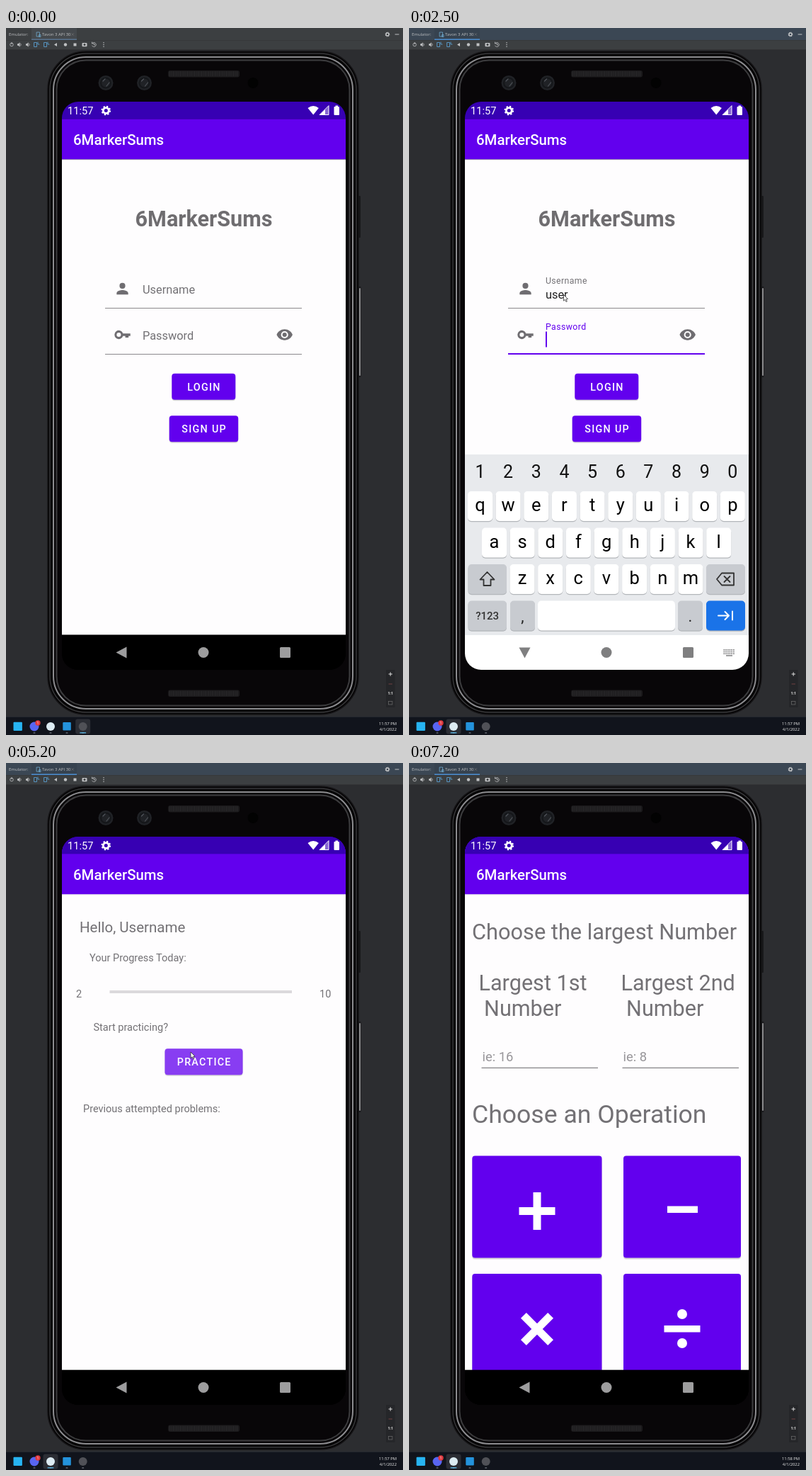
An HTML page for the animation above (7.6 s loop, 561 by 998 pixels).

```html
<!DOCTYPE html>
<html lang="en">
<head>
<meta charset="utf-8">
<title>Phone emulator demo</title>
<style>
html, body { margin: 0; width: 100%; height: 100%; overflow: hidden; background: #2c2d30; }
svg { display: block; width: 561px; height: 998px; font-family: Roboto, sans-serif; }
.desk { font-family: "Open Sans", "Noto Sans", sans-serif; }
.line { fill: none; stroke-linecap: round; stroke-linejoin: round; }
</style>
</head>
<body>
<svg id="stage" viewBox="0 0 561 998" xmlns="http://www.w3.org/2000/svg"></svg>
<script>
const LOOP = 7600, STEP = 100;
const PURPLE = '#6200ee', GREY = '#737175', CX = 279.5, CY = 505;
const APP = '6MarkerSums';

const rect = (x, y, w, h, fill, rx = 0, more = '') =>
  `<rect x="${x}" y="${y}" width="${w}" height="${h}" rx="${rx}" fill="${fill}" ${more}/>`;
const disc = (x, y, r, fill, more = '') => `<circle cx="${x}" cy="${y}" r="${r}" fill="${fill}" ${more}/>`;
const text = (x, y, size, str, fill = GREY, more = '') =>
  `<text x="${x}" y="${y}" font-size="${size}" fill="${fill}" xml:space="preserve" ${more}>${str}</text>`;
const mid = 'text-anchor="middle"';
const line = (d, color, width = 1, more = '') =>
  `<path class="line" d="${d}" stroke="${color}" stroke-width="${width}" ${more}/>`;
const shape = (d, fill, more = '') => `<path d="${d}" fill="${fill}" ${more}/>`;
const group = (id, inner, more = '') => `<g id="${id}" ${more}>${inner}</g>`;
const ring = (x, y, r, color, width) => disc(x, y, r, 'none', `stroke="${color}" stroke-width="${width}"`);
const icon = (x, y, d) => shape(d, '#6f6d71', `fill-rule="evenodd" transform="translate(${x} ${y}) scale(1.021) translate(-12 -12)"`);

function gear(x, y, r, color) {
  const tooth = 2 * Math.PI * r * .82 / 16;
  return ring(x, y, r * .58, color, r * .42) +
    disc(x, y, r * .82, 'none', `stroke="${color}" stroke-width="${r * .36}" stroke-dasharray="${tooth}"`);
}

function button(id, x, y, w, h, label) {
  return rect(x, y + 1.5, w, h, '#000', 4, 'opacity=".16"') + rect(x, y, w, h, PURPLE, 4) +
    rect(x, y, w, h, '#fff', 4, `id="${id}" opacity="0"`) +
    text(x + w / 2 + .7, y + h / 2 + 5.2, 14.3, label, '#fff', `${mid} font-weight="500" letter-spacing="1.28"`);
}

const page = (id, inner) => group(id,
  rect(79, 104, 401, 24.7, '#3700b3') + rect(79, 128.5, 401, 57, PURPLE) +
  rect(79, 185.5, 401, 671.2, '#fefdfe') + rect(79, 185.5, 401, 1, '#000', 0, 'opacity=".08"') +
  text(95, 165.4, 20.4, APP, '#fff', 'font-weight="500"') + inner + rect(79, 856.7, 401, 50, '#000'));

function field(id, y) {
  return group(id + 'Label', '') + rect(140, y, 278, 1, '#8b898c', 0, `id="${id}Line"`) +
    text(193, y - 13.5, 16.34, '', '#212121', `id="${id}Text"`) +
    rect(193, y - 31.5, 2, 22, PURPLE, 0, `id="${id}Caret"`);
}

function loginPage() {
  const person = 'M12 12a4 4 0 1 0 0-8a4 4 0 0 0 0 8zM12 14c-2.67 0-8 1.34-8 4v2h16v-2c0-2.66-5.33-4-8-4z';
  const key = 'M12.8 10.400a6 6 0 1 0 0 3.200H16v2.400h4.500v-2.400H23v-3.200zM7 15a3 3 0 1 1 0-6a3 3 0 0 1 0 6z';
  const eye = 'M12 4.5C7 4.5 2.7 7.6 1 12c1.7 4.4 6 7.5 11 7.5s9.3-3.1 11-7.5c-1.7-4.4-6-7.5-11-7.5z' +
    'M12 17a5 5 0 1 1 0-10a5 5 0 0 1 0 10zM12 9a3 3 0 1 0 0 6a3 3 0 0 0 0-6z';
  return page('login',
    text(CX, 279.5, 30.6, APP, '#6f6d70', `${mid} font-weight="700"`) +
    icon(164.5, 368, person) + icon(164.5, 433, key) + icon(393.7, 433, eye) +
    field('user', 395) + field('pass', 460) +
    button('loginTap', 234.3, 487.8, 90, 37, 'LOGIN') + button('signTap', 230.7, 547.3, 97.5, 37, 'SIGN UP'));
}

const homePage = () => page('home',
  text(104, 238.5, 20.5, 'Hello, Username') + text(118, 280, 14.5, 'Your Progress Today:') +
  text(99, 330.5, 14.5, '2') + text(443, 330.5, 14.5, '10') + rect(146.5, 321, 257.5, 4, '#dbd9dc') +
  text(123.5, 378, 14.5, 'Start practicing?') + button('practiceTap', 224.5, 403.3, 110, 37, 'PRACTICE') +
  text(109, 492.5, 14.5, 'Previous attempted problems:'));

function choosePage() {
  const tile = (x, y, w) => rect(x, y + 2, w, 144, '#000', 4, 'opacity=".16"') + rect(x, y, w, 144, PURPLE, 4);
  const input = (x, hint) => text(x + 1, 421, 18.4, hint, '#98969a') + rect(x, 429.8, 164.5, 1.2, '#807e82');
  const column = (x, nth) => text(x, 320.5, 30.6, 'Largest ' + nth) + text(x + 7.6, 356.5, 30.6, 'Number');
  const cross = (w, h, thick) => rect(-w / 2, -thick / 2, w, thick, '#fff') + rect(-thick / 2, -h / 2, thick, h, '#fff');
  return page('choose',
    text(89, 249, 30.75, 'Choose the largest Number') + column(98.5, '1st') + column(299.5, '2nd') +
    input(102.5, 'ie: 16') + input(301.5, 'ie: 8') + text(89, 507.5, 35.6, 'Choose an Operation') +
    tile(89.3, 554.5, 183.2) + tile(303, 554.5, 166) + tile(89.3, 721, 183.2) + tile(303, 721, 166) +
    `<g transform="translate(181 632.5)">${cross(51, 53, 11)}</g>` + rect(365, 625.5, 43, 9.5, '#fff') +
    `<g transform="translate(181 799) rotate(45)">${cross(54, 54, 11)}</g>` +
    rect(360.5, 794, 51, 9.5, '#fff') + disc(386, 778, 7, '#fff') + disc(386, 819, 7, '#fff'));
}

function keyboard() {
  const pitch = 39.65, keyW = 35, dim = '#c8cbd0';
  const cap = (x, y, w, fill = '#fff') => rect(x, y + 1.2, w, 42, '#b3b6ba', 5) + rect(x, y, w, 42, fill, 5);
  const row = (letters, cx, y) => [...letters].map((c, i) =>
    cap(cx + i * pitch - keyW / 2, y, keyW) + text(cx + i * pitch, y + 28, 25.5, c, '#000', mid)).join('');
  const digits = (cx, y, size, color) => [...'1234567890'].map((c, i) =>
    text(cx + i * pitch, y, size, c, color, mid)).join('');
  const c = '#686c71';
  const tools = disc(105, 625, 15.5, '#fff') + line('M108 620l-5 5l5 5', c, 2) +
    ring(155.5, 623.5, 5.5, c, 2) + line('M160 628l5.500 5.500', c, 2.2) +
    line('M209 618h11q2 0 2 2v9l-5 5h-8q-2 0-2-2v-12q0-2 2-2M211 627q3 5 7 0M211.500 623v.1M217.500 623v.1', c, 1.8) +
    text(271.5, 630, 14, 'GIF', c, `${mid} font-weight="700"`) +
    line('M324 618h12v16h-12zM328 618v-2h4v2M327 623h6M327 626h6M327 629h4', c, 1.8) +
    rect(366, 613, 1, 24, '#d0d2d5') + [394.5, 401, 407.5].map(x => disc(x, 625, 2, c)).join('') +
    rect(456, 615, 5.5, 12, c, 2.7) + line('M452.500 624q0 6 6.200 6q6.200 0 6.200-6M458.700 630v4', c, 1.7);
  return group('keyboard',
    rect(79, 602, 401, 256, '#e8eaed') + rect(79, 857, 401, 50, '#fff') +
    group('tools', tools) + group('digits', digits(100.5, 635, 25, '#111')) +
    row('qwertyuiop', 100.5, 654) + group('hints', digits(113, 664.5, 10, '#666')) +
    row('asdfghjkl', 120.5, 705.5) + row('zxcvbnm', 160, 757) +
    cap(83.5, 757, 54.5, dim) + line('M110.500 768l10 10.500h-5v8.500h-10v-8.500h-5z', '#333', 1.8) +
    cap(420, 757, 55, dim) + line('M442 769.500h17v17h-17l-7-8.500zM445.500 774l8 8M453.500 774l-8 8', '#333', 1.8) +
    cap(83.5, 808.5, 54.5, dim) + text(110.7, 835, 15, '?123', '#333', `${mid} font-weight="500"`) +
    cap(143, 808.5, 35, dim) + text(160.5, 838, 22, ',', '#222', mid) + cap(182, 808.5, 194) +
    cap(380, 808.5, 35, dim) + text(397.5, 838, 22, '.', '#222', mid) + cap(420, 808.5, 55, '#1a73e8') +
    line('M437 829.500h15M446.500 824l5.500 5.500l-5.500 5.500M457 823.500v12', '#fff', 2));
}

function statusBar() {
  return text(87, 121.8, 14.6, '11:57', '#fff') + gear(141.3, 116.5, 6.8, '#fff') +
    shape('M426.500 113q7.700-6 15.400 0l-7.700 9.500z', '#fff') +
    shape('M456 110v12.500h-12.500z', '#fff', 'opacity=".4"') + shape('M451 115v7.500h-7.500z', '#fff') +
    line('M456 110v12.500h-12.500z', '#fff', 1) + rect(463.5, 111, 7.5, 12, '#fff', 1) + rect(465.5, 109.5, 3.5, 2, '#fff');
}

const navBar = () => group('nav',
  `<path id="back" d="M-8 0L7 -8V8z"/><circle cx="279" cy="881.5" r="7.500"/>
   <rect x="387" y="874" width="15" height="15" rx="1.500"/>` +
  group('imeIcon', [0, 1, 2].map(r => [0, 1, 2, 3, 4, 5].map(i =>
    `<rect x="${444.5 + i * 2.7}" y="${877 + r * 2.7}" width="1.700" height="1.700"/>`).join('')).join('') +
    '<rect x="448" y="885.200" width="9" height="1.500"/>'));

function phone() {
  const speaker = y => rect(229, y, 101, 9.5, '#1c1b1d', 3) +
    `<path d="M231 ${y + 4.7}h97" stroke="#2b2a2c" stroke-width="7" stroke-dasharray="1 1.500"/>`;
  const camera = x => disc(x, 77.5, 10.5, '#202226') + ring(x, 77.5, 7, '#15171a', 2) +
    line(`M${x - 4} 75l3-3M${x + 1} 82l4-5`, '#50545a', 1.2);
  const frame = (inset, color, width, fill) => rect(59 + inset, 33 + inset, 439 - 2 * inset, 936 - 2 * inset,
    fill, 54 - inset, `stroke="${color}" stroke-width="${width}"`);
  return rect(497, 237, 4, 59, '#18181a', 1) + rect(497, 365, 4.5, 128, '#1b1b1d', 1) + rect(499, 367, 2, 124, '#8a8a8c', 1) +
    frame(0, '#151416', 1.5, '#050405') + frame(3, '#39393b', 1.5, 'none') +
    frame(8, '#8c8c8f', 2, '#080608') + frame(12.5, '#3c3c3e', 2, 'none') +
    speaker(60) + speaker(934.5) + camera(141) + camera(195.5) + disc(349, 77.5, 7.5, '#020202');
}

function desktop() {
  const c = '#bfc1c3';
  const tools = ring(8, 23.5, 2.3, c, .8) + rect(7.6, 20, .9, 3, c) +
    [19, 31].map(x => shape(`M${x - 3} 22.300h1.500l2-2v6.400l-2-2h-1.500z`, c) + line(`M${x + 1.7} 22q1.300 1.500 0 3`, c, .8)).join('') +
    [43, 57].map(x => line(`M${x - 3} 20.500h3.500v6h-3.500zM${x + 2} 20v3h2`, '#5b9fd0', .9)).join('') +
    shape('M68 23.500l4-2.500v5z', c) + disc(84, 23.5, 2.2, c) + rect(95.5, 21.5, 4, 4, c) +
    rect(107.5, 21, 7, 5.3, c, 1) + disc(111, 23.6, 1.5, '#3c3f41') +
    line('M122 21.500a3 3 0 1 1-.4 3.500M121.500 20v2h2M124.500 22v1.800h1.300', c, .8) +
    [20.8, 23.5, 26.2].map(y => disc(138, y, .75, c)).join('');
  const zoom = rect(537, 906, 12.5, 53, '#252629', 1) + line('M541 912h4.500M543.200 909.800v4.500', '#ddd', 1) +
    line('M541 926h4.500', '#7a4545', .9) + text(543.2, 941, 5.2, '1:1', '#ddd', `${mid} font-weight="700"`) +
    rect(540.4, 950.5, 5.5, 4.5, 'none', 0, 'stroke="#666" stroke-width=".8"');
  const taskbar = rect(0, 972, 561, 26, '#11141c') + rect(0, 972, 561, .7, '#2c3038') +
    rect(0, 975.5, 21, 21, '#fff', 3, 'id="activeBox" opacity=".11"') +
    rect(10.5, 979.7, 12.4, 12.4, '#27b4f2', 1) + disc(40, 986, 6.5, '#5865f2') +
    disc(45, 981, 3.7, '#e0383e') + text(45, 983, 5, '1', '#fff', mid) +
    disc(63, 986, 6, '#dcebf2') + rect(80.3, 980, 11.5, 11.5, '#2493dc', 1) + disc(108.7, 986, 6, '#505157') +
    [40, 63, 86, 108.7].map(x => rect(x - 1.5, 994.5, 3, 1, '#8b8f99', .5)).join('') +
    rect(0, 994.3, 9, 1.3, '#58bdf0', .6, 'id="activeMark"') +
    text(552, 984, 5.8, '', '#eee', 'id="clock" text-anchor="end"') + text(552, 991.6, 5.8, '4/1/2022', '#eee', 'text-anchor="end"');
  return rect(0, 0, 561, 998, '#2c2d30') + rect(0, 0, 561, 31, '#3c3f41') + rect(0, 0, 561, 17, '', 0, 'id="header"') +
    rect(0, 17, 561, .6, '#323436') + rect(0, 30.5, 561, .7, '#2a2b2d') + text(4, 11.3, 6, 'Emulator:', c) +
    rect(36, 0, 64, 17, '', 0, 'id="tab"') + rect(36, 15.3, 64, 1.7, '', 0, 'id="tabLine"') +
    line('M43.500 6h4v6h-4zM47 9.500h2v3h-2z', '#6fa9cc', .8) + text(51, 11.3, 6, 'Tavon 3 API 30', c) +
    line('M92.700 7.500l3 3M95.700 7.500l-3 3', '#777', .6) +
    gear(539, 9, 3.4, c) + line('M550 9h5', c, 1) + tools + zoom + taskbar;
}

const stage = document.getElementById('stage');
stage.innerHTML = '<defs><clipPath id="screen"><rect x="79" y="104" width="401" height="802" rx="23"/></clipPath></defs>' +
  group('desk', desktop(), 'class="desk"') + phone() +
  group('view', rect(79, 104, 401, 802, '#000') + loginPage() + homePage() + choosePage() + keyboard() + statusBar() + navBar(),
    'clip-path="url(#screen)"') +
  shape('M0 0V8.600L2 6.800L3.500 10L4.900 9.400L3.500 6.300L6 6z', '#fff', 'id="pointer" stroke="#333" stroke-width=".8" stroke-linejoin="round"');

const $ = id => document.getElementById(id);
const set = (id, attrs) => { for (const k in attrs) $(id).setAttribute(k, attrs[k]); };
const show = (id, on) => set(id, { visibility: on ? 'visible' : 'hidden' });
const ramp = (t, from, length) => Math.min(1, Math.max(0, (t - from) / length));
const lerp = (a, b, u) => a + (b - a) * u;
const outQuad = u => 1 - (1 - u) ** 2;

// Two-piece "fast out, extra slow in" curve
function emphasized(x) {
  const [px, py] = x < 1 / 6 ? [[0, .05, .1333, 1 / 6], [0, 0, .06, .4]] : [[1 / 6, .2083, .25, 1], [.4, .82, 1, 1]];
  const bez = ([a, b, c, d], u) => a * (1 - u) ** 3 + 3 * b * u * (1 - u) ** 2 + 3 * c * u * u * (1 - u) + d * u ** 3;
  let lo = 0, hi = 1;
  for (let i = 0; i < 20; i++) {
    const m = (lo + hi) / 2;
    if (bez(px, m) < x) lo = m; else hi = m;
  }
  return bez(py, lo);
}

const POINTER = [[500, 90, 450], [1000, 218.5, 376.5], [2700, 218.5, 376.5], [3000, 261.5, 499], [3500, 261.5, 499],
  [4000, 261.5, 517], [4200, 261.5, 517], [4700, 252, 373], [4800, 261, 408], [5300, 261, 408],
  [5700, 200, 412], [5800, 200, 412], [6600, 108, 350.5]];

function pointerAt(t) {
  const i = POINTER.findIndex(p => p[0] > t);
  if (i < 0) return POINTER.at(-1).slice(1);
  if (i === 0) return POINTER[0].slice(1);
  const [a, b] = [POINTER[i - 1], POINTER[i]];
  const u = ramp(t, a[0], b[0] - a[0]);
  return [lerp(a[1], b[1], u), lerp(a[2], b[2], u)];
}

const typed = (t, str, times) => str.slice(0, times.filter(at => t >= at).length);

function drawField(id, label, y, t, focusAt, blurAt, value) {
  const u = outQuad(ramp(t, focusAt, 140)), focused = t >= focusAt && t < blurAt;
  $(id + 'Label').innerHTML = text(193, lerp(y - 20, y - 34, u), lerp(16.34, 12.25, u), label,
    focused ? PURPLE : GREY, `letter-spacing="${.42 * u}"`);
  set(id + 'Line', { height: focused ? 2 : 1, y: focused ? y - 1 : y, fill: focused ? PURPLE : '#8b898c' });
  $(id + 'Text').textContent = value;
  set(id + 'Caret', { x: 193 + (value ? $(id + 'Text').getComputedTextLength() + 1 : 0) });
  show(id + 'Caret', focused && (value !== '' || (t - focusAt) % 1000 < 500));
}

function openPage(t, start, from, to) {
  const u = ramp(t, start, 400), e = emphasized(u);
  const zoom = s => `translate(${CX} ${CY}) scale(${s}) translate(${-CX} ${-CY})`;
  set(from, { transform: zoom(1 + .05 * e) });
  set(to, { transform: zoom(.85 + .15 * e), opacity: ramp(t, start + 35, 50) });
}

function draw(t) {
  const active = t >= 1100, slot = active ? 63 : 108.7;
  set('activeBox', { x: slot - 10.5 });
  set('activeMark', { x: slot - 4.5 });
  set('header', { fill: active ? '#3b4754' : '#3c3f41' });
  set('tab', { fill: active ? '#36424f' : '#45494d' });
  set('tabLine', { fill: active ? '#4a88c7' : '#587089' });
  $('clock').textContent = t < 7200 ? '11:57 PM' : '11:58 PM';

  drawField('user', 'Username', 395, t, 1130, 2340, typed(t, 'user', [1700, 1800, 2000, 2100]));
  drawField('pass', 'Password', 460, t, 2340, 9999, typed(t, '••••', [2600, 2700, 2800, 2900]));
  set('loginTap', { opacity: t >= 3200 && t < 3500 ? .24 : 0 });
  set('practiceTap', { opacity: t >= 5100 && t < 5500 ? .24 : 0 });

  const raised = outQuad(ramp(t, 1230, 280)) * (1 - ramp(t, 3350, 250) ** 2);
  set('keyboard', { transform: `translate(0 ${304 * (1 - raised)})`, opacity: raised ** 1.2 });
  const numeric = t >= 2400;
  set('tools', { display: numeric ? 'none' : 'inline' });
  set('hints', { display: numeric ? 'none' : 'inline' });
  set('digits', { display: numeric ? 'inline' : 'none' });
  set('nav', { fill: raised > .6 ? '#7f7f80' : raised > 0 ? '#bababa' : '#9d9d9e' });
  show('imeIcon', raised > 0);
  const turn = -90 * ramp(t, 1350, 250) * (1 - ramp(t, 3600, 600));
  set('back', { transform: `translate(163.500 881.500) rotate(${turn})` });

  openPage(t, 3917, 'login', 'home');
  if (t >= 5310) openPage(t, 5310, 'home', 'choose');
  else set('choose', { opacity: 0 });

  const [x, y] = pointerAt(t);
  set('pointer', { transform: `translate(${x} ${y})` });
  show('pointer', t >= 500 && t < 6700);
}

const began = performance.now();
function tick() {
  const t = (performance.now() - began) % LOOP;
  draw(Math.floor(t / STEP) * STEP);
  requestAnimationFrame(tick);
}
draw(0);
requestAnimationFrame(tick);
</script>
</body>
</html>
```
